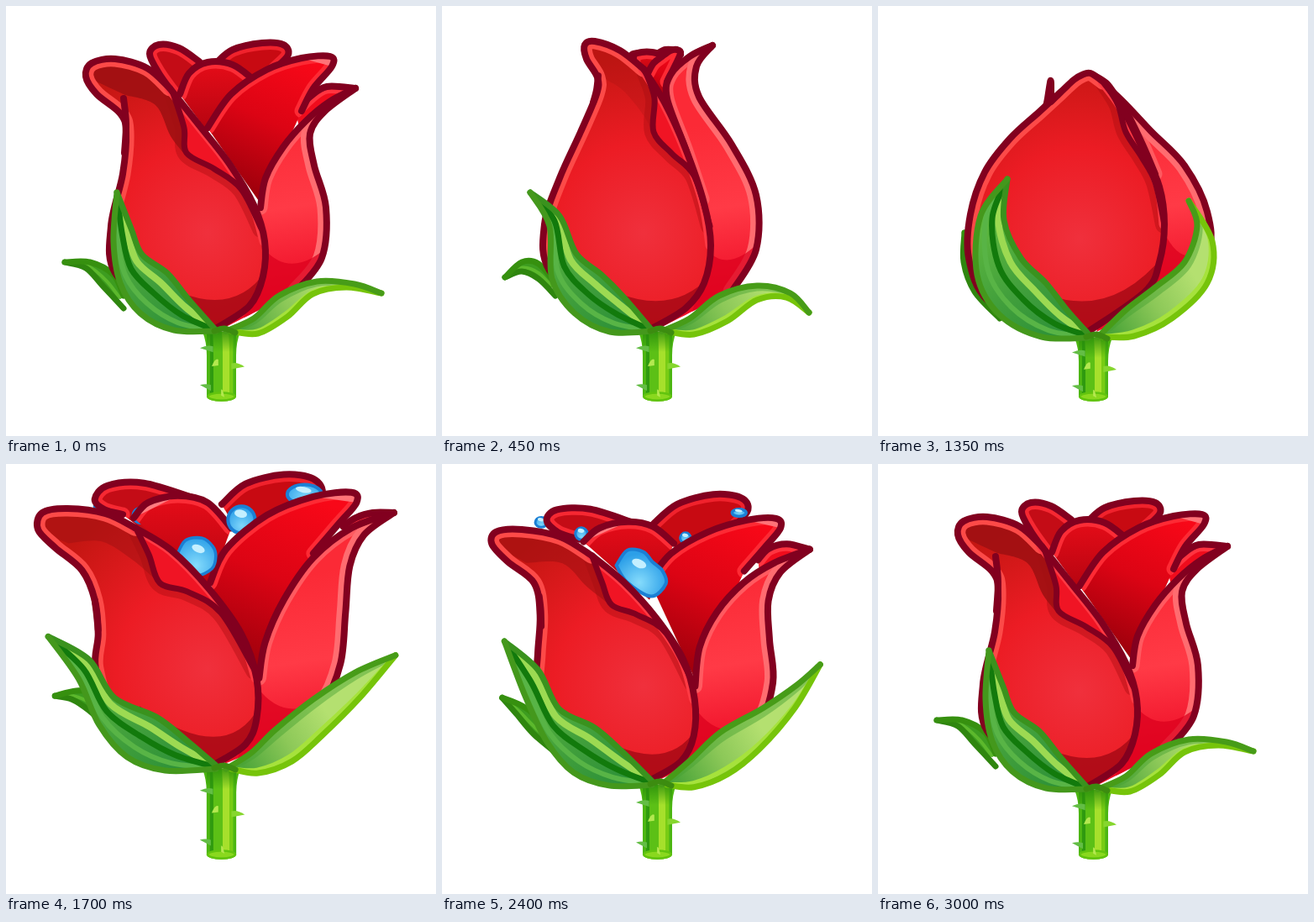
Animation, 512 px wide and 512 px high, one loop 3050 ms. Source, as an HTML page with a canvas:

```html
<!DOCTYPE html>
<html lang="en">
<head>
<meta charset="utf-8">
<title>Rose</title>
<style>
html, body { margin: 0; width: 100%; height: 100%; overflow: hidden; background: #fff; }
canvas { display: block; width: 512px; height: 512px; }
</style>
</head>
<body>
<canvas id="stage" width="512" height="512"></canvas>
<script>
const ctx = document.getElementById('stage').getContext('2d');
const LOOP = 3050, STEP = 50;
const TIMES = [0, 450, 850, 1350, 1700, 2150, 2600, 3000];
const ORDER = [0, 1, 2, 3, 4, 4, 5, 0]; // open, closing, bud, squash, wide, wide, settle, open
const DARK = '#82001f';

// ---- tracks: monotone interpolation of point strings; "/" splits a shape into edges
const nums = s => s.match(/-?[\d.]+/g).map(Number);

function track(keys) {
  const sizes = keys[0][1].split('/').map(s => nums(s).length);
  const ks = keys.map(([t, s]) => ({ t, v: nums(s) }));
  const slope = (i, n) => (ks[i + 1].v[n] - ks[i].v[n]) / (ks[i + 1].t - ks[i].t);
  const tangent = (i, n) => {
    if (i === 0 || i === ks.length - 1) return 0;
    const a = slope(i - 1, n), b = slope(i, n);
    return a * b > 0 ? 2 * a * b / (a + b) : 0;
  };
  const raw = t => {
    if (t <= ks[0].t) return ks[0].v;
    const i = ks.findIndex((k, j) => ks[j + 1] && t < ks[j + 1].t);
    if (i < 0) return ks[ks.length - 1].v;
    const h = ks[i + 1].t - ks[i].t, u = (t - ks[i].t) / h, w = 1 - u;
    return ks[i].v.map((a, n) =>
      a * (1 + 2 * u) * w * w + ks[i + 1].v[n] * u * u * (3 - 2 * u) +
      h * (tangent(i, n) * u * w * w - tangent(i + 1, n) * u * u * w));
  };
  const edges = t => {
    const v = raw(t);
    let at = 0;
    return sizes.map(size => {
      const pts = [];
      for (const end = at + size; at < end; at += 2) pts.push([v[at], v[at + 1]]);
      return pts;
    });
  };
  return { raw, edges };
}

const posed = (poses, extra = []) =>
  track(TIMES.map((t, i) => [t, poses[ORDER[i]]]).concat(extra).sort((a, b) => a[0] - b[0]));

// stem top, lip shade, tip gloss
const mood = posed(['388 .9 0', '388 .25 0', '388 .1 0', '395 0 0', '364 .5 1', '395 .7 1']);

const front = posed([
  '190,370 130,318 125,262 139,200 143,150 136,128 108,105 95,84 102,68 130,63 168,74 195,98 / 230,142 266,188 295,237 308,280 306,322 290,357 250,384',
  '190,372 128,315 122,260 140,205 165,150 184,105 185,85 172,63 170,46 182,42 212,53 240,75 / 265,115 290,170 312,235 320,285 312,330 290,360 250,384',
  '195,375 140,335 124,285 126,235 143,190 168,148 198,107 216,80 223,63 233,48 246,45 262,55 / 278,85 302,145 318,190 326,240 323,290 305,335 250,382',
  '195,385 130,350 108,300 110,248 127,198 157,158 192,126 217,103 233,88 243,82 253,80 268,90 / 290,120 315,170 335,215 341,260 335,305 318,340 250,388',
  '190,345 128,295 108,245 111,205 107,165 92,130 60,103 40,82 45,62 75,57 120,63 155,80 / 197,106 242,152 280,205 298,257 298,305 285,335 250,358',
  '190,375 135,340 118,295 119,240 128,190 126,150 96,126 79,105 85,94 115,93 160,104 195,130 / 230,165 265,206 293,252 304,297 302,337 285,367 250,388'
]);

const fold = posed([
  '199,104 212,145 215,175 248,194 280,218 304,265',
  '243,80 253,110 252,150 274,176 300,202 319,262',
  '265,60 271,92 280,125 300,158 317,195 326,245',
  '270,92 286,118 295,150 314,180 330,210 341,260',
  '157,83 171,112 184,145 216,155 256,180 296,248',
  '197,133 207,162 215,184 245,197 276,217 302,270'
]);

const lip = posed([
  '97,85 101,72 128,66 166,77 195,102 208,140 214,178 / 196,155 178,118 142,106 / 97,85',
  '172,60 174,50 184,46 210,56 238,80 250,110 250,150 / 240,130 215,100 190,85 / 172,60',
  '225,70 232,58 238,52 245,50 258,58 268,80 272,100 / 260,85 245,75 235,72 / 225,70',
  '235,95 240,88 246,86 252,85 262,92 275,110 282,125 / 270,112 255,100 245,95 / 235,95',
  '42,85 48,66 75,60 120,67 155,84 170,110 183,145 / 152,118 115,96 76,98 / 42,85',
  '82,105 88,97 115,96 160,107 195,134 205,160 213,184 / 190,166 168,134 125,132 / 82,105'
]);

const nib = posed([
  '140,110 143,140 141,175', '186,83 184,100 180,115', '215,82 211,88 206,96',
  '217,103 212,108 206,114', '107,165 109,180 111,200', '126,146 128,165 127,185'
]);

const right = posed([
  '303,240 309,205 330,168 357,137 385,114 416,98 / 380,125 362,152 367,190 381,240 376,300 345,340 / 260,383',
  '310,230 290,170 268,110 272,82 295,60 322,47 / 303,72 306,108 345,165 374,225 374,290 345,340 / 260,383',
  '322,200 308,160 290,110 278,85 270,60 262,50 / 277,68 303,118 345,170 373,235 368,290 330,340 / 260,380',
  '330,200 315,165 298,130 285,110 272,92 256,82 / 290,112 325,149 365,190 392,245 392,295 345,350 / 260,388',
  '301,257 308,215 330,165 365,115 410,80 460,62 / 425,88 408,125 403,180 397,240 375,290 330,330 / 260,358',
  '302,270 306,220 325,185 355,160 385,145 420,130 / 385,158 371,190 377,230 390,275 375,330 330,350 / 260,388'
]);

const middle = posed([
  '240,145 268,105 310,76 352,62 386,60 388,72 366,98 352,125 / 303,235',
  '245,80 252,68 262,60 272,53 280,52 284,56 278,70 268,90 / 275,130',
  '262,80 264,70 266,62 267,53 269,50 271,54 274,62 276,70 / 290,130',
  '262,110 264,105 268,100 270,98 272,98 274,100 276,104 278,110 / 295,150',
  '243,145 262,105 310,65 365,43 410,38 416,50 395,75 365,110 / 302,255',
  '250,135 280,108 320,93 360,84 388,84 392,95 375,115 355,140 / 302,260'
]);

const centre = posed([
  '207,105 218,80 240,67 270,70 295,88 / 240,150', '228,65 229,58 238,55 250,55 262,58 / 250,85',
  '262,70 264,62 266,54 268,52 270,56 / 266,90', '262,100 264,97 267,96 270,97 272,100 / 268,110',
  '153,68 170,50 205,42 240,50 268,80 / 243,150', '186,110 205,95 235,88 262,92 285,105 / 250,170'
]);

const backLeft = posed([
  '200,105 182,80 171,57 182,46 206,50 230,66 / 235,100', '232,80 228,68 226,58 234,56 246,56 256,60 / 250,80',
  '250,90 251,75 255,64 260,57 264,54 266,58 / 262,90', '200,120 202,110 205,91 206,91 206,108 206,120 / 220,130',
  '140,64 118,58 107,46 122,30 165,27 225,45 / 180,95', '185,108 160,98 145,82 155,72 190,73 230,88 / 210,120'
]);

const backRight = posed([
  '250,68 270,52 305,44 330,46 336,58 320,75 / 280,95', '250,62 258,56 266,52 274,52 280,54 284,58 / 265,75',
  '264,70 265,60 266,51 268,50 270,54 272,62 / 268,80', '262,110 264,102 266,97 268,97 270,99 272,106 / 268,115',
  '257,52 285,28 330,17 365,22 375,40 350,60 / 290,110', '248,85 275,62 315,50 345,53 352,65 345,85 / 290,115'
]);

const backLip = posed([
  '345,125 362,108 382,96 416,98 / 350,150', '280,75 290,66 303,56 320,48 / 290,80',
  '270,70 268,62 266,56 264,52 / 272,75', '275,110 273,105 270,100 268,98 / 278,115',
  '400,78 415,68 435,62 460,62 / 400,100', '355,140 368,124 390,119 420,130 / 360,160'
]);

// leaves: both edges run from tip to base
const leafLeft = posed([
  '132,222 128,280 136,330 160,366 200,386 250,387 / 132,222 149,265 162,296 192,318 218,350 250,386',
  '105,222 128,262 131,325 158,366 200,388 250,387 / 105,222 140,250 160,295 190,320 215,345 250,386',
  '163,185 136,250 131,310 158,358 200,384 250,385 / 163,185 170,240 182,285 212,312 230,345 250,384',
  '154,206 122,250 118,320 145,368 195,394 250,395 / 154,206 150,255 170,300 200,330 225,362 250,390',
  '52,208 88,258 112,312 145,350 190,366 250,364 / 52,208 100,235 130,280 180,303 215,330 250,360',
  '100,215 112,290 135,345 165,380 205,395 250,395 / 100,215 130,255 150,300 185,322 215,352 250,390'
]);

const leafRight = posed([
  '447,342 415,331 370,328 325,345 295,372 262,387 / 447,342 405,335 365,343 335,370 300,390 268,387',
  '437,365 415,342 375,333 330,345 295,372 262,387 / 437,365 410,347 375,350 340,375 300,391 268,387',
  '383,218 374,260 352,295 320,325 290,362 262,386 / 383,218 384,275 365,330 335,368 300,388 268,387',
  '370,232 380,262 365,305 330,335 295,362 262,394 / 370,232 398,280 392,330 350,372 305,393 268,394',
  '462,230 415,250 365,282 320,318 292,345 262,364 / 462,230 420,280 375,325 340,355 300,369 268,364',
  '442,254 428,282 395,302 340,322 300,360 262,394 / 442,254 420,305 380,350 340,380 300,396 268,395'
], [[640, '460,300 425,310 375,322 330,343 295,370 262,386 / 460,300 425,335 385,360 345,380 300,391 268,387']]);

const leafBack = posed([
  '70,305 100,305 128,320 140,345 / 70,305 95,312 115,333 140,360',
  '75,323 95,305 115,307 135,330 / 75,323 95,316 115,325 135,345',
  '113,255 118,275 122,300 150,350 / 113,255 118,300 130,330 150,352',
  '103,270 106,290 115,320 140,365 / 103,270 102,305 115,340 145,372',
  '60,278 85,272 105,275 130,300 / 60,278 80,282 100,295 125,318',
  '80,279 100,300 118,318 150,360 / 80,279 95,310 115,340 150,368'
]);

// dew: x, y, rx, ry
const dew = (x, y, rx, ry, x2, y2, r2) => track([
  [1500, `256 ${y + 70} 0 0`], [1750, `${x} ${y} ${rx} ${ry}`], [2150, `${x} ${y} ${rx} ${ry}`],
  [2600, `${x2} ${y2} ${r2} ${r2}`], [2750, `${x2 + 10} ${y2 + 10} 0 0`]
]);
const dewFar = dew(98, 47, 11, 9, 141, 94, 6);
const dewLeft = dew(150, 58, 12, 12, 185, 110, 5);
const dewRight = dew(366, 33, 25, 15, 345, 85, 0);
const dewMid = dew(283, 63, 20, 20, 300, 115, 0);
const dewBig = track([
  [1500, '240,160 '.repeat(8)],
  [1750, '199,108 211,87 233,84 247,95 251,108 246,124 225,134 206,126'],
  [2150, '199,108 211,87 233,84 247,95 251,108 246,124 225,134 206,126'],
  [2600, '223,143 237,130 251,138 257,150 275,156 283,170 273,188 242,164'],
  [2850, '285,222 '.repeat(8)]
]);

// ---- drawing helpers
function curve(path, pts, join) {
  if (!join) path.moveTo(...pts[0]);
  for (let i = 0; i < pts.length - 1; i++) {
    const a = pts[i - 1] || pts[i], b = pts[i], c = pts[i + 1], d = pts[i + 2] || c;
    path.bezierCurveTo(b[0] + (c[0] - a[0]) / 6, b[1] + (c[1] - a[1]) / 6,
      c[0] - (d[0] - b[0]) / 6, c[1] - (d[1] - b[1]) / 6, c[0], c[1]);
  }
  return path;
}

function outline(edges) {
  const path = new Path2D();
  let end = null;
  for (const e of edges) {
    curve(path, end ? [end, ...e] : e, end);
    end = e[e.length - 1];
  }
  path.closePath();
  return path;
}

const openPath = pts => curve(new Path2D(), pts);
const mix = (a, b, u) => a.map((p, i) => [p[0] + (b[i][0] - p[0]) * u, p[1] + (b[i][1] - p[1]) * u]);
const joined = (a, b) => [a[a.length - 1], ...b];

function stroke(path, color, width) {
  ctx.strokeStyle = color;
  ctx.lineWidth = width;
  ctx.stroke(path);
}

function fill(path, color) {
  ctx.fillStyle = color;
  ctx.fill(path);
}

function within(path, draw) {
  ctx.save();
  ctx.clip(path);
  draw();
  ctx.restore();
}

function blend(x0, y0, x1, y1, ...colors) {
  const g = ctx.createLinearGradient(x0, y0, x1, y1);
  colors.forEach((c, i) => g.addColorStop(i / (colors.length - 1), c));
  return g;
}

function glow(x, y, r, ...colors) {
  const g = ctx.createRadialGradient(x, y, 0, x, y, r);
  colors.forEach((c, i) => g.addColorStop(i / (colors.length - 1), c));
  return g;
}

function petal(edges, color, rim, gloss) {
  const shape = outline(edges), edge = openPath(edges[0]);
  fill(shape, color);
  within(shape, () => {
    stroke(edge, rim, 17);
    if (gloss) gloss();
  });
  stroke(edge, DARK, 8);
}

function shade(x0, y0, cx, cy, x1, y1, color) {
  const p = new Path2D();
  p.moveTo(x0, y0);
  p.quadraticCurveTo(cx, cy, x1, y1);
  p.lineTo(x1 + 40, 420);
  p.lineTo(x0 - 40, 420);
  fill(p, color);
}

function ellipse(x, y, rx, ry, turn = 0) {
  const p = new Path2D();
  p.ellipse(x, y, rx, ry, turn, 0, 7);
  return p;
}

function drop(tr, t) {
  const [x, y, rx, ry] = tr.raw(t);
  if (rx < 1 || t < 1500) return;
  const p = ellipse(x, y, Math.max(rx - 2, .5), Math.max(ry - 2, .5));
  fill(p, glow(x, y + ry * .4, rx * 1.2, '#7fd6fb', '#2c9fe8'));
  stroke(p, '#1b7fd4', Math.min(4, rx / 3));
  fill(ellipse(x - rx * .05, y - ry * .4, rx * .42, ry * .26, .2), '#c4efff');
}

function bigDrop(t) {
  if (t <= 1500 || t >= 2850) return;
  const pts = dewBig.edges(t)[0];
  const p = curve(new Path2D(), [...pts, pts[0]]);
  const x = (pts[0][0] + pts[4][0]) / 2, y = (pts[2][1] + pts[6][1]) / 2;
  const size = Math.min(1, (pts[6][1] - pts[2][1]) / 50);
  fill(p, glow(x, y + 10, 34, '#86dcfc', '#2c9fe8'));
  stroke(p, '#1b7fd4', 4 * size);
  fill(ellipse(pts[2][0] - 5 * size, pts[2][1] + 14 * size, 9 * size, 5 * size, .4), '#c4efff');
}

function sparkle(t) {
  const s = Math.max(0, Math.sin((t - 1900) / 500 * Math.PI));
  if (t < 1900 || t > 2400) return;
  const star = new Path2D();
  for (let i = 0; i < 16; i++) {
    const r = s * (i % 2 ? 2 : i % 4 ? 8 : 13), a = i * Math.PI / 8 + .3;
    star.lineTo(362 + r * Math.cos(a), 29 + r * Math.sin(a));
  }
  fill(star, '#e8fbff');
}

// ---- parts
function stem(top) {
  const body = (l, r, flare) => {
    const p = new Path2D();
    p.moveTo(l - flare, top);
    p.quadraticCurveTo(l, top + 12, l, top + 28);
    p.lineTo(l, 466);
    p.lineTo(r, 466);
    p.lineTo(r, top + 28);
    p.quadraticCurveTo(r, top + 12, r + flare, top);
    return p;
  };
  fill(ellipse(256.5, 465, 17.5, 6), '#5cc014');
  fill(body(239, 274, 5), '#4cb612');
  fill(body(243, 247, 0), '#2f9a10');
  fill(body(247, 271, 1), '#5cc016');
  fill(body(258, 266, 1), '#a6e02c');
  fill(body(266, 270, 1), '#78cc14');
  fill(ellipse(256.5, 465, 16, 4.5), '#8ad81e');
  stroke(ellipse(256.5, 465, 16, 4.5), '#62c40e', 2.5);
  fill(blendTop(top), blend(0, top, 0, top + 24, 'rgba(40,140,10,.8)', 'rgba(40,140,10,0)'));
  const thorn = (x, k, dx, dy, color) => {
    const y = 466 - k * (466 - top), p = new Path2D();
    p.moveTo(x + dx, y + dy);
    p.quadraticCurveTo(x + dx * .3, y - 5, x - dx * .3, y - 3);
    p.lineTo(x - dx * .3, y + 4);
    p.closePath();
    fill(p, color);
  };
  thorn(243, .74, -12, -1, '#63bd45');
  thorn(251, .54, -6, 5, '#b4e850');
  thorn(272, .48, 12, 1, '#86d62e');
  thorn(241, .15, -10, -3, '#63bd45');
  thorn(257, .08, 3, 6, '#b4e850');
}

function blendTop(top) {
  const p = new Path2D();
  p.rect(239, top, 35, 24);
  return p;
}

function leaf([a, b], color, details, edgeA, edgeB, width) {
  const shape = curve(openPath(a), b.slice().reverse(), true);
  fill(shape, color);
  within(shape, () => details(u => openPath(mix(a, b, u))));
  stroke(openPath(b), edgeB, width);
  stroke(openPath(a), edgeA, width);
}

function rightPetal(t, side) {
  const e = right.edges(t), shape = outline(e);
  const outer = openPath(joined(e[0], e[1])), inner = openPath(e[0]);
  const s = side[3], d = e[1][4];
  fill(shape, blend(320, 140, 350, 340, '#fb2a36', '#ff3a46', '#ee0c26'));
  within(shape, () => {
    stroke(inner, '#ff5a60', 17);
    stroke(outer, '#ff6c70', 21);
    shade(s[0], s[1] + 10, (s[0] + d[0]) / 2, d[1] + 28, d[0] + 14, d[1] - 20, 'rgba(220,0,30,.75)');
  });
  stroke(inner, DARK, 8);
  stroke(outer, DARK, 8);
}

function frontPetal(t, top, lipShade) {
  const e = front.edges(t), shape = outline(e);
  const rightEdge = joined(e[0], e[1]), wave = fold.edges(t)[0];
  const left = openPath(e[0]), wavy = openPath(wave), s = e[1][3];
  fill(shape, glow(240, top - 118, 215, '#f0303c', '#ec1c24', '#c41612'));
  within(shape, () => {
    stroke(wavy, 'rgba(165,10,15,.4)', 22);
    ctx.globalAlpha = lipShade;
    fill(outline(lip.edges(t)), '#a01012');
    ctx.globalAlpha = 1;
    stroke(left, '#fc4a48', 19);
    shade(160, top - 74, 265, top, s[0] + 5, s[1] + 30, 'rgba(140,0,14,.6)');
    const strip = openPath(rightEdge.slice(0, 5));
    curve(strip, wave.slice().reverse(), true);
    fill(strip, '#f01424');
    stroke(openPath(rightEdge.slice(0, 5)), '#ff3a44', 13);
  });
  stroke(wavy, DARK, 7);
  stroke(openPath(rightEdge), DARK, 8);
  stroke(left, DARK, 8);
  stroke(openPath(nib.edges(t)[0]), DARK, 8);
}

function draw(t) {
  ctx.setTransform(1, 0, 0, 1, 0, 0);
  ctx.clearRect(0, 0, 512, 512);
  ctx.lineCap = ctx.lineJoin = 'round';
  const swell = t > 1600 && t < 2150 ? Math.sin((t - 1600) / 550 * Math.PI) : 0;
  ctx.translate(256, 470);
  ctx.scale(1 + .016 * swell, 1 + .018 * swell);
  ctx.translate(-256, -470);

  const [top, lipShade, gloss] = mood.raw(t);
  const side = front.edges(t)[1];
  const mid = middle.edges(t), core = centre.edges(t);
  const lens = (pts, alpha) => () => {
    ctx.globalAlpha = alpha;
    fill(openPath(pts), '#ff7c80');
    ctx.globalAlpha = 1;
  };

  leaf(leafBack.edges(t), '#3d9c20', vein => stroke(vein(.6), '#5cb82c', 4), '#36900f', '#2f860f', 7);
  drop(dewFar, t);
  petal(backLeft.edges(t), '#c40c16', '#f62832');
  drop(dewLeft, t);
  petal(backRight.edges(t), '#c80a12', '#f0222c');
  drop(dewRight, t);
  sparkle(t);
  petal(core, blend(0, core[0][2][1], 0, core[1][0][1], '#e60c18', '#b40410'), '#fb2c36', lens(core[0].slice(0, 3), gloss));
  drop(dewMid, t);
  petal(backLip.edges(t), '#f00c1c', '#ff3440');
  petal(mid, blend(mid[0][3][0], mid[0][3][1], mid[1][0][0] - 20, mid[1][0][1] - 20, '#f80818', '#dc0414', '#a0000c'),
    '#fd2a34', lens(mid[0].slice(3, 6), .9));
  bigDrop(t);
  rightPetal(t, side);
  frontPetal(t, top, lipShade);
  stem(top);

  leaf(leafRight.edges(t), blend(285, top, 385, top - 60, '#4ea63a', '#8cc858', '#b4e070'), vein => {
    stroke(vein(.15), 'rgba(70,160,50,.45)', 8);
    stroke(vein(.86), '#a6e23c', 6);
  }, '#479c18', '#76c40a', 7);
  leaf(leafLeft.edges(t), blend(130, top - 130, 220, top, '#5cb63e', '#42a03c', '#2c9038'), vein => {
    stroke(vein(.25), '#58b446', 6);
    stroke(vein(.76), '#9cda52', 8);
    stroke(vein(.5), '#127a0c', 7);
  }, '#44981c', '#3a921e', 7);
  stroke(openPath([[248, top - 1], [260, top - 4], [273, top + 1]]), '#3c8c10', 7);
}

function tick() {
  const t = performance.now() % LOOP;
  draw(Math.floor(t / STEP) * STEP);
  requestAnimationFrame(tick);
}
tick();
</script>
</body>
</html>
```
